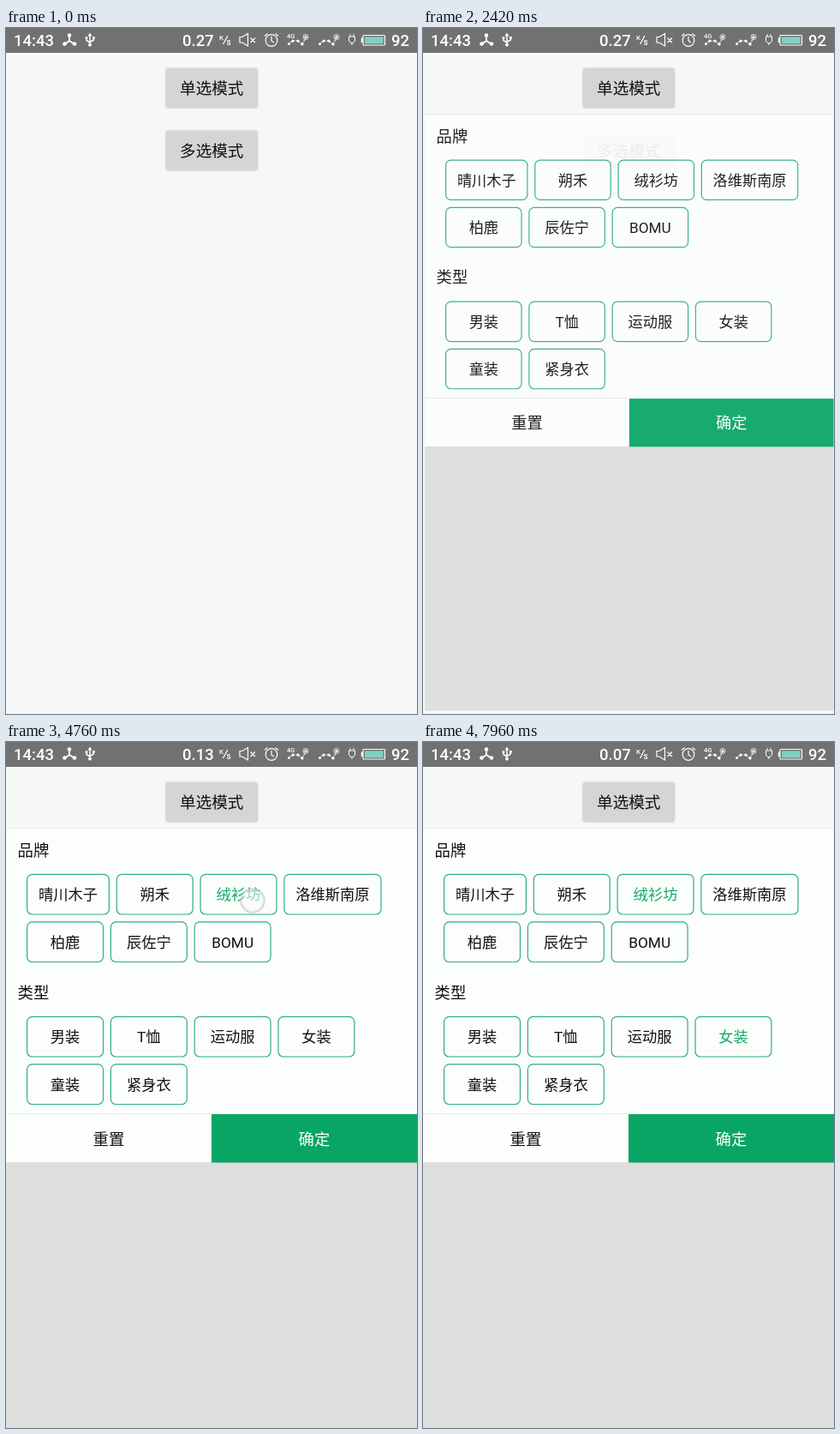
These frames come from a looping animation (480 px wide and 800 px high, 8000 ms). An HTML page:

```html
<!DOCTYPE html>
<html lang="zh-CN">
<head>
<meta charset="utf-8">
<style>
html, body { margin: 0; width: 100%; height: 100%; overflow: hidden; background: #f7f6f9; }
svg { display: block; width: 480px; height: 800px; font-family: Roboto, "Noto Sans CJK SC", "Noto Sans CJK", sans-serif; }
.status { fill: #fff; font-size: 18.5px; font-weight: 500; }
.line { fill: none; stroke: #fff; stroke-width: 1.2; }
.mid { text-anchor: middle; }
.button rect { fill: #d5d5d5; filter: drop-shadow(0 .6px 1px rgba(0,0,0,.28)); }
.button.down rect { fill: #cacbc9; filter: drop-shadow(0 1.5px 2.5px rgba(0,0,0,.36)); }
.button text { font-size: 18.6px; font-weight: 500; fill: #111; }
.chip rect { fill: #fcfefb; stroke: #2fae80; stroke-width: 1.2; }
.chip text { font-size: 17.3px; fill: #111; }
.chip.on text { fill: #12a86b; }
.label { font-size: 18.4px; fill: #111; }
</style>
</head>
<body>
<svg viewBox="0 0 480 800">
  <defs>
    <radialGradient id="glow">
      <stop offset="0" stop-color="#fff" stop-opacity=".55"/>
      <stop offset=".8" stop-color="#f4f4f4" stop-opacity=".6"/>
      <stop offset="1" stop-color="#ccc" stop-opacity=".65"/>
    </radialGradient>
    <g id="signal" fill="#fff">
      <path class="line" stroke-dasharray="2 1.2" d="M1 18.5 6 15H12L17 19 21 11"/>
      <circle cx="1.5" cy="18.5" r="1.5"/><circle cx="6" cy="15" r="1.6"/>
      <circle cx="12" cy="15" r="1.6"/><circle cx="17" cy="19" r="1.6"/>
      <circle cx="21" cy="10.5" r="1.6"/>
      <circle class="line" cx="21" cy="10.5" r="3" style="stroke-width:.8"/>
    </g>
  </defs>
  <rect id="page" width="480" height="800"/>
  <g id="buttons"></g>
  <g id="panel">
    <rect y="100" width="480" height="700" fill="#dedfdd"/>
    <rect y="100" width="480" height="390" fill="#fcfefb"/>
    <path d="M0 100.5H480M0 433.5H240" stroke="#e9eae8"/>
    <rect x="240" y="434" width="240" height="56.5" fill="#08a564"/>
    <g class="label">
      <text x="13.5" y="133">品牌</text>
      <text x="13.5" y="298.5">类型</text>
      <text class="mid" x="120" y="469.5">重置</text>
      <text class="mid" x="360" y="469.5" fill="#fff">确定</text>
    </g>
    <g id="chips"></g>
  </g>
  <g class="status">
    <rect width="480" height="29" fill="#717171"/>
    <text x="9" y="21">14:43</text>
    <text id="speed" x="206" y="21"></text>
    <text x="450" y="21">92</text>
    <path class="line" style="stroke-width:2" d="M74 8V15L69 18.5M74 15 79.5 18.5"/>
    <circle cx="74" cy="8.5" r="2.3"/><circle cx="68.5" cy="18.5" r="2.3"/><circle cx="80" cy="18.5" r="2.3"/>
    <path class="line" style="stroke-width:1.5" d="M98 8V20M94 11V14.5L98 17M102.3 11V14L98 16.5"/>
    <path d="M98 5.5 100.5 9.5H95.5Z"/>
    <circle cx="98" cy="19.7" r="1.9"/><circle cx="94" cy="11.5" r="1.5"/><path d="M101 10h2.8v2.8H101z"/>
    <text x="249" y="13.5" style="font-size:8px">K</text>
    <text x="257.5" y="20" style="font-size:10px">s</text>
    <path class="line" d="M253.5 19 259 9M273 10.5H276L282.5 6.5V21L276 17H273ZM285.5 11.5 291 17M291 11.5 285.5 17"/>
    <circle class="line" cx="310" cy="14.5" r="6.8"/>
    <path class="line" d="M310 10V15L313 17M302 9.5 305.5 6.5M318 9.5 314.5 6.5"/>
    <text x="328" y="12" style="font-size:7.5px">4G</text>
    <use href="#signal" x="329"/><use href="#signal" x="365"/>
    <path class="line" style="stroke-width:1" d="M402 7V10M406 7V10M400.5 10H407.5V15L405.5 17.5H402.5L400.5 15ZM404 17.5V20"/>
    <rect class="line" x="417" y="8.5" width="25.5" height="11.5" rx="1"/>
    <rect x="419" y="10.3" width="21.7" height="8" fill="#7fd0c2"/>
    <rect x="414.8" y="11.5" width="1.8" height="5.5"/>
  </g>
  <g id="touch">
    <circle r="14" fill="url(#glow)" stroke="#bbb" stroke-opacity=".75" stroke-width="1.2"/>
  </g>
</svg>
<script>
const LOOP = 8000, OPEN = 2420;
const $ = id => document.getElementById(id);
const clamp = v => Math.max(0, Math.min(1, v));

function box(parent, cls, name, x, y, w, h, r, size) {
  $(parent).insertAdjacentHTML('beforeend', `<g class="${cls}">
    <rect x="${x}" y="${y}" width="${w}" height="${h}" rx="${r}"/>
    <text class="mid" x="${x + w / 2}" y="${y + h / 2 + size * .38}">${name}</text></g>`);
  return $(parent).lastElementChild;
}

const single = box('buttons', 'button', '单选模式', 187, 47.3, 106.5, 45.7, 2, 18.6);
box('buttons', 'button', '多选模式', 187, 120, 106.5, 45.7, 2, 18.6);

const rows = [
  [154.4, '晴川木子 朔禾 绒衫坊 洛维斯南原'],
  [209.9, '柏鹿 辰佐宁 BOMU'],
  [320.4, '男装 T恤 运动服 女装'],
  [375.9, '童装 紧身衣']
];
const chips = {};
for (const [y, names] of rows) {
  let x = 24.6;
  for (const name of names.split(' ')) {
    const wide = /^[A-Z]+$/.test(name) ? 0 : name.length * 17.3 + 26.6;
    const w = Math.max(88.9, wide);
    chips[name] = box('chips', 'chip', name, x, y, w, 46.6, 6, 17.3);
    x += w + 8.9;
  }
}

// chip, selected from, until
const picks = [['绒衫坊', 4720, LOOP], ['运动服', 6260, 7580], ['女装', 7580, LOOP]];
// start, end, x, y
const touches = [[2300, 2420, 257, 66], [4620, 4890, 288, 185], [6140, 6380, 278, 335], [7460, 7720, 358, 347]];

function draw(t) {
  $('page').setAttribute('fill', t < 2100 ? '#f7f6f9' : '#f6f8f5');
  $('speed').textContent = t < 2780 ? '0.27' : t < 5780 ? '0.13' : '0.07';
  single.classList.toggle('down', t >= 2320 && t < OPEN);

  const left = 1 - clamp((t - OPEN) / 90);
  $('panel').setAttribute('visibility', t < OPEN ? 'hidden' : 'visible');
  $('panel').setAttribute('opacity', 1 - .07 * left);
  $('panel').setAttribute('transform',
    `translate(400 100) scale(${1 - .0055 * left}) translate(-400 -100)`);

  for (const [name, from, to] of picks)
    chips[name].classList.toggle('on', t >= from && t < to);

  const touch = touches.find(([from, to]) => t >= from && t < to);
  $('touch').setAttribute('visibility', touch ? 'visible' : 'hidden');
  if (touch) {
    const [from, to, x, y] = touch;
    $('touch').setAttribute('transform', `translate(${x} ${y})`);
    $('touch').setAttribute('opacity', Math.min(clamp((t - from) / 40), clamp((to - t) / 140)));
  }
}

const begin = performance.now();
function tick() {
  draw((performance.now() - begin) % LOOP);
  requestAnimationFrame(tick);
}
tick();
</script>
</body>
</html>
```
